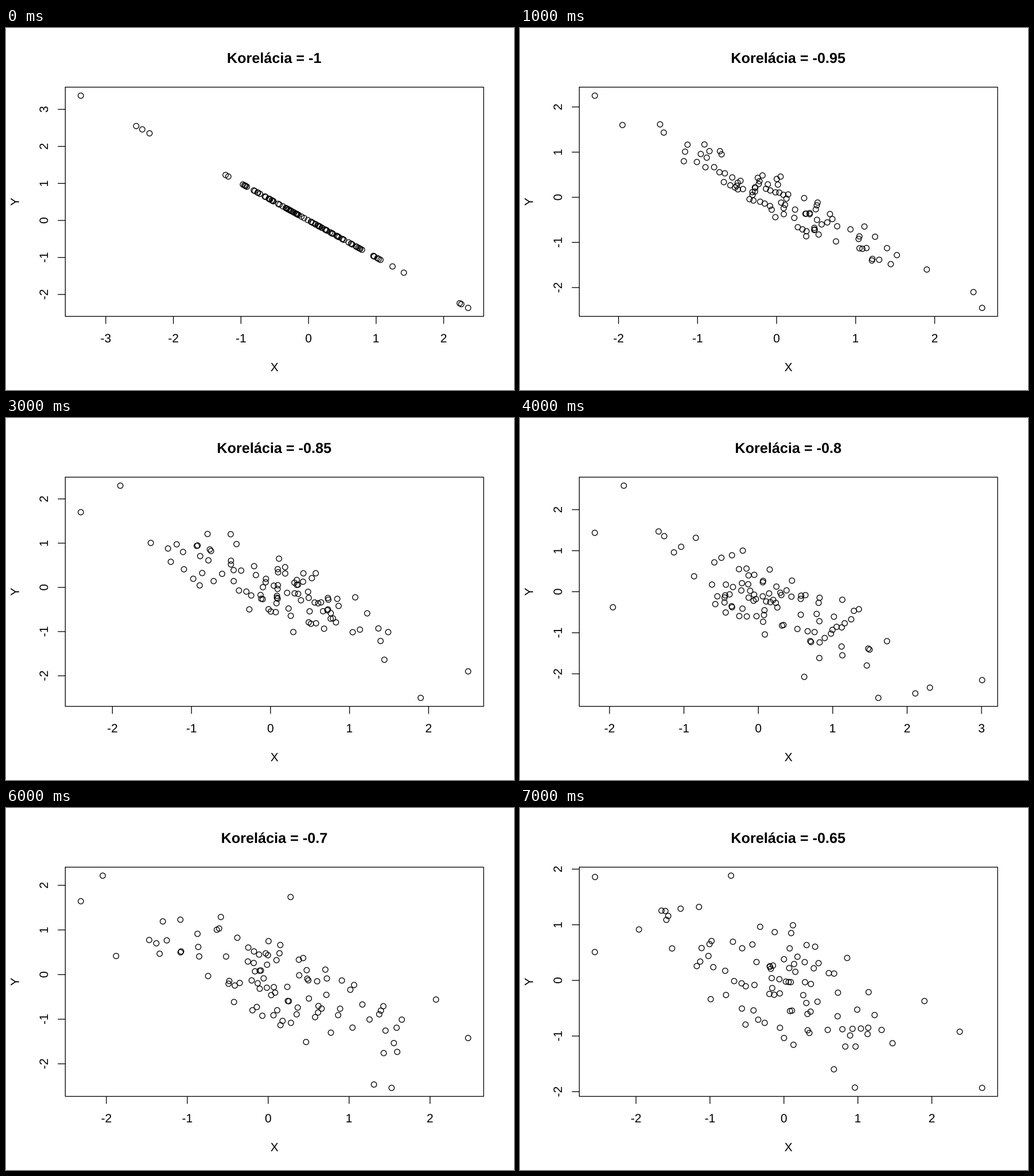
Animation, 885 px wide and 632 px high, one loop 8 s. Source, as a matplotlib script:

```python
import numpy as np
import matplotlib.pyplot as plt
from matplotlib.animation import FuncAnimation
from matplotlib.patches import PathPatch
from matplotlib.textpath import TextPath
from matplotlib.transforms import Affine2D

W, H = 885, 632
DPI = 64
PT = 72 / DPI            # points per pixel
LINE = 25.2              # height of one margin line in pixels
LEFT, TOP = 4.1 * LINE, 4.1 * LINE
RIGHT, BOTTOM = W - 2.1 * LINE, H - 5.1 * LINE
STROKE = 1.31
RADIUS = 4.73
TOTAL = 100
SPREAD = 0.85

# Correlation, shift of the cloud's centre, outlying points that set the axes
SCENES = [
    (-1, 0, [(x, -x) for x in (-3.37, -2.55, -2.46, -2.353,
                               2.237, 2.261, 2.362)]),
    (-0.95, 0.05, [(-2.3, 2.25), (-1.95, 1.6), (1.9, -1.6),
                   (2.49, -2.1), (2.6, -2.45)]),
    (-0.9, 0.15, [(-1.731, 1.337), (-1.143, 1.642), (1.757, -2.526),
                  (2.597, -1.984), (2.803, -1.837), (3.139, -2.994)]),
    (-0.85, 0.05, [(-2.4, 1.7), (-1.9, 2.3), (1.9, -2.5), (2.5, -1.9)]),
    (-0.8, 0.15, [(-2.198, 1.435), (-1.808, 2.584), (-1.955, -0.379),
                  (0.617, -2.075), (1.613, -2.587), (2.11, -2.478),
                  (2.306, -2.337), (3.008, -2.154)]),
    (-0.75, 0, [(-3.85, 3.282), (-2.476, 1.873), (-2.559, 1.283),
                (-2.245, 0.554), (-1.054, 2.58), (1.288, -2.25),
                (2.016, -1.631), (2.7, -3.083)]),
    (-0.7, 0.15, [(-2.316, 1.643), (-2.045, 2.216), (-1.88, 0.416),
                  (0.277, 1.738), (1.307, -2.464), (1.525, -2.54),
                  (2.074, -0.56), (2.471, -1.422)]),
    (-0.65, 0, [(-2.554, 1.858), (-2.557, 0.509), (-1.96, 0.915),
                (-0.715, 1.882), (0.96, -1.926), (1.9, -0.371),
                (2.377, -0.922), (2.68, -1.932)]),
]


def cloud(seed, rho, shift, outer):
    """Seeded correlated sample that stays inside the outlying points."""
    outer = np.array(outer)
    u, v = np.random.RandomState(seed).normal(size=(2, 400))
    x = shift + SPREAD * u
    y = -shift + SPREAD * (rho * u + np.sqrt(1 - rho ** 2) * v)
    core = np.column_stack([x, y])
    inside = (core > outer.min(axis=0)) & (core < outer.max(axis=0))
    core = core[inside.all(axis=1) & (np.hypot(u, v) < 2)]
    return np.vstack([outer, core[:TOTAL - len(outer)]])


def scale(values, start, end):
    """Map data to pixels with 4 % of free space at both ends."""
    lo, hi = values.min(), values.max()
    pad = 0.04 * (hi - lo)
    lo, hi = lo - pad, hi + pad
    ticks = np.arange(np.ceil(lo), np.floor(hi) + 1)
    return ticks, lambda v: start + (v - lo) / (hi - lo) * (end - start)


fig = plt.figure(figsize=(W / DPI, H / DPI), dpi=DPI, facecolor="white")
ax = fig.add_axes([0, 0, 1, 1])


def line(xs, ys):
    ax.plot(xs, ys, color="black", lw=STROKE * PT, snap=False,
            solid_capstyle="round", solid_joinstyle="round")


def text(x, y, s, size=21, weight="normal", angle=0):
    """Outlined text centred on x, y along its baseline."""
    path = TextPath((0, 0), s, size=size,
                    prop={"family": "Liberation Sans", "weight": weight})
    box = path.get_extents()
    move = (Affine2D().translate(-(box.x0 + box.x1) / 2, 0).scale(1, -1)
            .rotate_deg(-angle).translate(x, y))
    ax.add_patch(PathPatch(move.transform_path(path), facecolor="black",
                           linewidth=0, snap=False))


def draw(i):
    rho, shift, outer = SCENES[i]
    x, y = cloud(i + 1, rho, shift, outer).T
    ax.clear()
    ax.set_axis_off()
    ax.set_xlim(0, W)
    ax.set_ylim(H, 0)

    xticks, px = scale(x, LEFT, RIGHT)
    yticks, py = scale(y, BOTTOM, TOP)
    ax.scatter(px(x), py(y), s=(2 * RADIUS * PT) ** 2, facecolors="none",
               edgecolors="black", linewidths=STROKE * PT)

    line([LEFT, RIGHT, RIGHT, LEFT, LEFT], [TOP, TOP, BOTTOM, BOTTOM, TOP])
    for t in xticks:
        line([px(t)] * 2, [BOTTOM, BOTTOM + LINE / 2])
        text(px(t), BOTTOM + 1.8 * LINE, f"{t:.0f}")
    for t in yticks:
        line([LEFT, LEFT - LINE / 2], [py(t)] * 2)
        text(LEFT - 1.2 * LINE, py(t), f"{t:.0f}", angle=90)

    mid_x, mid_y = (LEFT + RIGHT) / 2, (TOP + BOTTOM) / 2
    text(mid_x, BOTTOM + 3.8 * LINE, "X")
    text(LEFT - 3.2 * LINE, mid_y, "Y", angle=90)
    text(mid_x, 61, f"Korelácia = {rho:g}", size=25.2, weight="bold")
    return []


anim = FuncAnimation(fig, draw, frames=len(SCENES), interval=1000,
                     repeat=True, repeat_delay=0)
plt.show()
```
